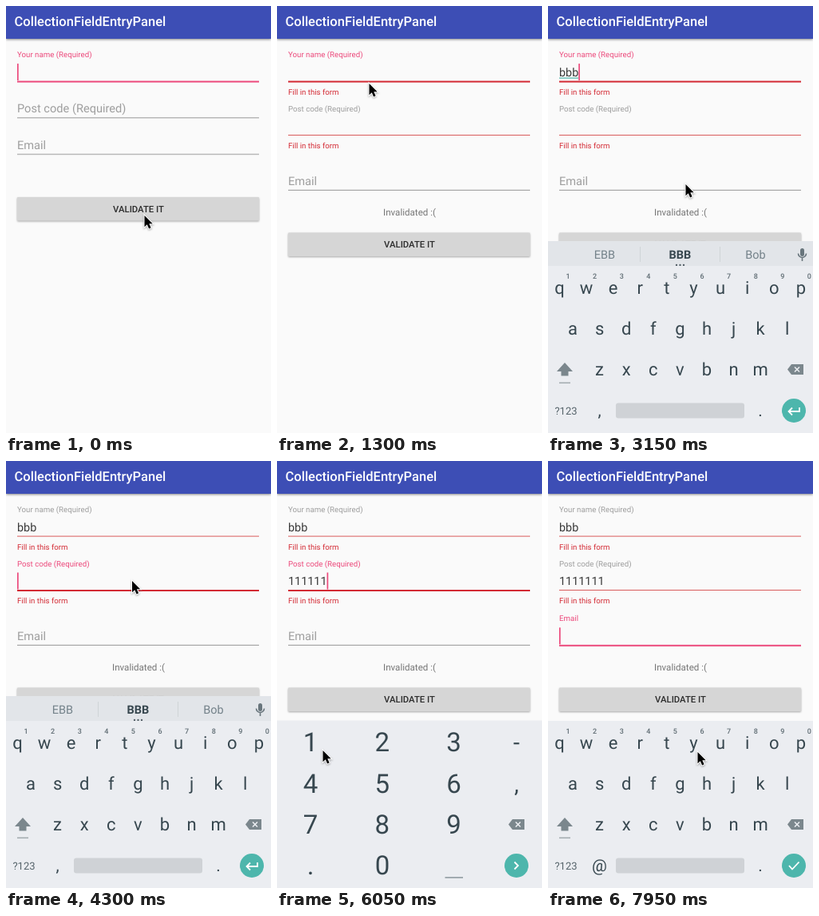
An HTML page for the animation above (8000 ms loop, 332 by 534 pixels).

```html
<!DOCTYPE html>
<html lang="en">
<head>
<meta charset="utf-8">
<title>Form validation</title>
<style>
  html, body { margin: 0; width: 100%; height: 100%; overflow: hidden; background: #fafafa; }
  svg { display: block; width: 332px; height: 534px; font-family: Roboto, sans-serif; text-rendering: geometricPrecision; }
  .mid { text-anchor: middle; }
  .key { fill: #37474f; text-anchor: middle; }
  .icon { fill: #7b878d; }
  .soft { filter: drop-shadow(0 1px 1px #0005); }
</style>
</head>
<body>
<svg id="stage" viewBox="0 0 332 534"></svg>
<script>
const LOOP = 8000;
const GRAY = '#9e9e9e', PINK = '#ec4a7c', RED = '#d32a34', TEAL = '#4db6ac';
const VALIDATED = 500, FOCUS_NAME = 1660, FOCUS_POST = 4250, FOCUS_EMAIL = 6910;
const NAME_KEYS = [2350, 2550, 2750];
const POST_KEYS = [5050, 5250, 5430, 5620, 5810, 6000, 6220];
const INPUTS = [-250, FOCUS_NAME, ...NAME_KEYS, FOCUS_POST, ...POST_KEYS, FOCUS_EMAIL];
// time, x, y of the pointer tip
const POINTER = [
  [0, 173.5, 262], [650, 173.5, 262], [1300, 115.5, 97], [1500, 104, 84], [1750, 104, 84],
  [2150, 210.5, 470], [2300, 200, 458], [2800, 200, 458], [3150, 172.5, 223],
  [3600, 158, 150], [4350, 158, 150], [4900, 57.5, 362], [6350, 57.5, 362],
  [6800, 150, 214], [7250, 150, 214], [7950, 187.5, 364], [8000, 188, 366]
];

const stage = document.getElementById('stage');

function add(tag, attrs, parent = stage, content = '') {
  const el = document.createElementNS('http://www.w3.org/2000/svg', tag);
  set(el, attrs);
  el.textContent = content;
  return parent.appendChild(el);
}
function set(el, attrs) {
  for (const name in attrs) el.setAttribute(name, attrs[name]);
}
const group = (parent = stage) => add('g', {}, parent);
const rect = (x, y, width, height, fill, parent, rx = 0) =>
  add('rect', { x, y, width, height, fill, rx }, parent);
const text = (content, x, y, size, attrs, parent) =>
  add('text', { x, y, 'font-size': size, ...attrs }, parent, content);
const show = (el, on) => set(el, { visibility: on ? 'visible' : 'hidden' });

const clamp = v => Math.min(1, Math.max(0, v));
const smooth = v => v * v * (3 - 2 * v);
const progress = (t, start, length) => smooth(clamp((t - start) / length));
const mix = (a, b, k) => a + (b - a) * k;
const countUntil = (times, t) => times.filter(at => at <= t).length;

// Form
function makeField(label) {
  return {
    line: rect(14, 0, 303, 1, GRAY),
    label: text(label, 14, 0, 9.7, {}),
    value: text('', 14, 0, 14.4, { fill: '#3a3a3a' }),
    error: text('Fill in this form', 14, 0, 9.65, { fill: RED })
  };
}
const nameField = makeField('Your name (Required)');
const postField = makeField('Post code (Required)');
const emailField = makeField('Email');
const composing = rect(14, 89.5, 24, 1.2, TEAL);
const caret = rect(0, 0, 1.7, 21, PINK);
const status = text('Invalidated :(', 166, 262, 11.6, { fill: '#777', class: 'mid' });
const button = group();
rect(14, 239, 303, 29.5, '#d6d6d6', button, 1).setAttribute('class', 'soft');
text('VALIDATE IT', 166, 257.7, 11.3, { class: 'mid', fill: '#2c2c2c', 'font-weight': 500 }, button);

// Toolbar
const bar = rect(0, 0, 332, 41, '#3d4eb5');
bar.style.filter = 'drop-shadow(0 1px 1.5px #0007)';
text('CollectionFieldEntryPanel', 10.5, 25.3, 16.5, { fill: '#fff', 'font-weight': 500 });

// Keyboards
const BOARD = '#ebedf1';
const key = (label, x, y, size, parent) => text(label, x, y, size, { class: 'key' }, parent);

function backspace(x, parent) {
  const icon = add('g', { transform: `translate(${x} 454.5)` }, parent);
  add('path', { d: 'M-10 0L-5-6.5H10V6.5H-5Z', class: 'icon' }, icon);
  add('path', { d: 'M-1-3L5 3M5-3L-1 3', stroke: BOARD, 'stroke-width': 1.6 }, icon);
}
function action(x, d, parent) {
  const icon = add('g', { transform: `translate(${x} 506)` }, parent);
  add('circle', { r: 15, fill: TEAL }, icon);
  add('path', { d, fill: 'none', stroke: '#fff', 'stroke-width': 1.8 }, icon);
}

const letters = group();
const strip = group(letters);
rect(0, 294, 332, 32, '#e2e5e9', strip);
rect(115, 301, 1, 19, '#cfd4d7', strip);
rect(215, 301, 1, 19, '#cfd4d7', strip);
rect(316, 303, 5, 10, '#68757c', strip, 2.5);
add('path', { d: 'M313.5 309.5a5 5 0 0 0 10 0M318.5 315v4', fill: 'none',
  stroke: '#68757c', 'stroke-width': 1.6 }, strip);
const suggestions = group(strip);
text('EBB', 71, 316, 14.5, { class: 'mid', fill: '#74828a' }, suggestions);
text('BBB', 165.5, 316, 14.5, { class: 'key', 'font-weight': 700 }, suggestions);
text('Bob', 260, 316, 14.5, { class: 'mid', fill: '#74828a' }, suggestions);
for (const x of [161, 165.5, 170]) add('circle', { cx: x, cy: 324, r: 1.2, fill: '#546068' }, suggestions);

rect(0, 325, 332, 209, BOARD, letters);
const STEP = 33.6;
[['qwertyuiop', 14.5, 359.5], ['asdfghjkl', 31, 410.5], ['zxcvbnm', 64.5, 461.5]].forEach(([row, x, y]) =>
  [...row].forEach((letter, i) => key(letter, x + i * STEP, y, 22, letters)));
[...'1234567890'].forEach((digit, i) =>
  text(digit, 25 + i * STEP, 341, 9, { class: 'mid', fill: '#5f6c73', 'font-weight': 500 }, letters));
add('path', { d: 'M21 446L31 457H25.5V462.5H16.5V457H11Z', class: 'icon' }, letters);
rect(14, 470.5, 14, 1.6, '#a5adb1', letters);
backspace(310, letters);
text('?123', 22.5, 510.5, 13, { class: 'mid', fill: '#56646b' }, letters);
const extraKey = key(',', 64.5, 513, 21, letters);
rect(85, 496.5, 161, 19, '#cfd2d6', letters, 3);
key('.', 266, 513, 21, letters);
const enter = group(letters), done = group(letters);
action(308, 'M7-4V1H-6M-2-3.5L-6.5 1L-2 5.5', enter);
action(308, 'M-6 0L-2 4.5L6.5-4.5', done);

const numbers = group();
rect(0, 324.5, 332, 210, BOARD, numbers);
[...'123456789'].forEach((digit, i) =>
  key(digit, 42 + i % 3 * 89.8, 363.4 + Math.floor(i / 3) * 51.2, 33, numbers));
key('.', 42, 517, 33, numbers);
key('0', 132, 517, 33, numbers);
key('-', 300, 362, 29, numbers);
key(',', 300, 414, 29, numbers);
rect(210.5, 520, 22.5, 1.8, '#9aa5aa', numbers);
backspace(300, numbers);
action(300, 'M-2.5-4.5L2 0L-2.5 4.5', numbers);

const pointer = add('path', {
  d: 'M0 0V14.2L3.3 11.2L5.6 16.4L8.1 15.3L5.8 10.2H10.2Z',
  fill: '#000', stroke: '#fff', 'stroke-width': 2, 'paint-order': 'stroke', class: 'soft'
});

function pointerAt(t) {
  const i = Math.max(1, POINTER.findIndex(step => step[0] > t));
  const [from, to] = [POINTER[i - 1], POINTER[i]];
  const k = progress(t, from[0], to[0] - from[0]);
  return [mix(from[1], to[1], k), mix(from[2], to[2], k)];
}

function drawField(field, { lineY, floated, focused, value = '', error = 0, idle }) {
  const height = focused ? 2 : idle.width;
  const fill = error ? (focused ? RED : '#d95c5c') : focused ? PINK : idle.color;
  set(field.line, { y: lineY, height, fill });
  set(field.label, {
    y: mix(lineY - 6.2, lineY - 29.5, floated),
    'font-size': mix(14.6, 9.7, floated),
    fill: focused ? PINK : GRAY
  });
  set(field.value, { y: lineY - 5.8 });
  field.value.textContent = value;
  set(field.error, { y: lineY + 17.4, opacity: error });
}

function render(t) {
  const checked = t >= VALIDATED;
  const error = progress(t, VALIDATED, 200);
  const focus = t >= FOCUS_EMAIL ? 2 : t >= FOCUS_POST ? 1 : 0;
  const idle = checked ? { width: 1, color: '#959595' } : { width: 1.5, color: '#b8b8b8' };
  const lineY = [93.6, checked ? 161 : 139, checked ? 229.8 : 184.7];
  const fields = [nameField, postField, emailField];

  drawField(nameField, { lineY: lineY[0], floated: 1, focused: focus === 0, error, idle,
    value: 'b'.repeat(countUntil(NAME_KEYS, t)) });
  drawField(postField, { lineY: lineY[1], floated: error, focused: focus === 1, error, idle,
    value: '1'.repeat(countUntil(POST_KEYS, t)) });
  drawField(emailField, { lineY: lineY[2], floated: progress(t, FOCUS_EMAIL, 200), focused: focus === 2, idle });

  const value = fields[focus].value;
  const width = value.textContent ? value.getComputedTextLength() : 0;
  const lastInput = INPUTS.filter(at => at <= t).pop();
  set(caret, { x: 14 + width, y: lineY[focus] - 21.5 });
  show(caret, (t - lastInput) % 1000 < 500);
  set(composing, { width: focus === 0 ? width : 0 });

  show(status, checked);
  set(button, { transform: `translate(0 ${checked ? 44.5 : 0})` });

  const rise = progress(t, FOCUS_NAME - 20, 200);
  const numeric = t >= 4350 && t < 7000;
  const emailBoard = t >= 7000;
  set(letters, {
    transform: `translate(0 ${(1 - rise) * 240})`,
    display: rise > 0 && !numeric ? 'inline' : 'none'
  });
  set(numbers, { display: numeric ? 'inline' : 'none' });
  set(strip, { display: emailBoard ? 'none' : 'inline' });
  set(suggestions, { display: t >= NAME_KEYS[1] ? 'inline' : 'none' });
  set(enter, { display: emailBoard ? 'none' : 'inline' });
  set(done, { display: emailBoard ? 'inline' : 'none' });
  extraKey.textContent = emailBoard ? '@' : ',';

  set(pointer, { transform: `translate(${pointerAt(t)})` });
}

const start = performance.now();
function tick() {
  render((performance.now() - start) % LOOP);
  requestAnimationFrame(tick);
}
tick();
</script>
</body>
</html>
```
